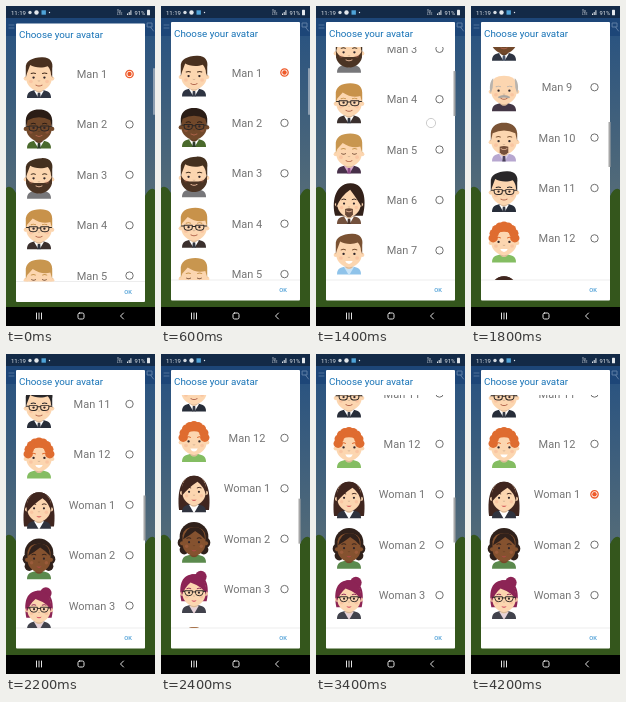
These frames come from a looping animation (149 by 320 pixels, 4400 ms). An HTML page:

```html
<!DOCTYPE html>
<html lang="en">
<head>
<meta charset="utf-8">
<title>Avatar picker</title>
<style>
html, body { margin: 0; width: 100%; height: 100%; overflow: hidden; background: #000; }
svg { display: block; width: 149px; height: 320px; font-family: Roboto, Arial, sans-serif; }
.label { font-size: 11px; fill: #757575; text-anchor: middle; }
.line { fill: none; stroke-linecap: round; stroke-linejoin: round; }
.ring { fill: none; stroke: #707070; stroke-width: 1; }
.dot { fill: none; }
.on .ring { stroke: #ee5a2a; stroke-width: 1.3; }
.on .dot { fill: #ee5a2a; }
</style>
</head>
<body>
<svg viewBox="0 0 149 320">
  <defs>
    <clipPath id="view"><rect x="10" y="41" width="129" height="233"/></clipPath>
    <linearGradient id="sky" x1="0" y1="0" x2="0" y2="1">
      <stop offset="0" stop-color="#2b5480"/><stop offset="1" stop-color="#556c78"/>
    </linearGradient>
  </defs>

  <rect y="12" width="149" height="18" fill="#1d4678"/>
  <rect y="30" width="149" height="165" fill="url(#sky)"/>
  <path d="M0 182Q5 178 10 187V301H0ZM139 190Q144 180 149 184V301H139Z" fill="#34561c"/>
  <rect y="192" width="149" height="109" fill="#34561c"/>
  <path class="line" d="M3 19H8M3 22H8" stroke="#4f7099"/>
  <path class="line" d="M141.5 17H146V21H141.5ZM144.5 21L147.5 25" stroke="#5d7ca3"/>

  <rect width="149" height="12" fill="#132a47"/>
  <g fill="#e4e8ec" font-size="6">
    <text x="5" y="8.8">11:19</text>
    <circle cx="24" cy="6.5" r="1.7" fill="#d6dce2"/>
    <circle cx="30.5" cy="6.5" r="2.2"/>
    <rect x="35.5" y="4.3" width="4.4" height="4.4" fill="#4fa3d8"/>
    <circle cx="43.5" cy="6.5" r=".7"/>
    <text x="111" y="6.3" font-size="3.4">Vo</text>
    <text x="111" y="9.4" font-size="3.4">LTE</text>
    <path d="M121 9V7.5H122V9ZM122.7 9V6H123.7V9ZM124.4 9V4.2H125.4V9Z"/>
    <text x="128.5" y="8.8" font-size="5.8">91%</text>
    <rect x="141" y="3.7" width="3" height="5.6" rx=".6"/>
  </g>
  <rect id="handle" x="147" y="62" width="2" height="47" rx="1" fill="#8fa0b2"/>

  <g id="dialog">
    <rect x="10" y="16" width="129" height="278.5" rx="1" fill="#fff"/>
    <text x="13" y="30.8" font-size="9.8" fill="#1672b6">Choose your avatar</text>
    <path d="M10 274H139" stroke="#e6e6e6" stroke-width=".7"/>
    <g clip-path="url(#view)">
      <g id="list"></g>
    </g>
    <rect id="bar" x="137.5" width="2" height="45" fill="#a6a6a6"/>
    <text x="122" y="286" font-size="5.8" font-weight="500" text-anchor="middle" fill="#4d9fd6">OK</text>
  </g>
  <circle id="ripple" cx="123.5" cy="140" r="8" fill="#0001"/>
  <circle id="touch" r="4.6" fill="#fff" fill-opacity=".6" stroke="#c0c0c0" stroke-width=".8"/>

  <rect y="301" width="149" height="19" fill="#000"/>
  <g class="line" stroke="#e2e2e2">
    <path d="M30.5 307V313M33 307V313M35.5 307V313M117.5 307L114.5 310L117.5 313"/>
    <rect x="72" y="307" width="6" height="6" rx="1.6"/>
  </g>
</svg>
<script>
const PITCH = 50.4, FIRST = 66.5, STEP = 200, LOOP = 4400, PICK = 3800;
const $ = id => document.getElementById(id);
const path = (d, fill) => `<path d="${d}" fill="${fill}"/>`;
const line = (d, color, w = 0.8) => `<path class="line" d="${d}" stroke="${color}" stroke-width="${w}"/>`;
const dot = (x, y, r, fill) => `<circle cx="${x}" cy="${y}" r="${r}" fill="${fill}"/>`;
const pair = (x, y, r, fill) => dot(-x, y, r, fill) + dot(x, y, r, fill);

const PALE = '#fcd6b0', DARK = '#71482a', NAVY = '#2e3442';

function curls(color, n, r, spread) {
  let out = '';
  for (let i = 0; i < n; i++) {
    const a = Math.PI * (1.02 + 0.96 * i / (n - 1));
    out += dot((Math.cos(a) * spread).toFixed(1), (-3 + Math.sin(a) * 11).toFixed(1), r, color);
  }
  return out;
}

// Each style returns [behind the face, in front of it].
const hairStyles = {
  crop: c => ['', path('M-10.5 0V-8C-11 -15 -5 -17 2 -17.5C9 -18 11.5 -13 10.5 -8V0L9.5 -3C9.5 -6 8.5 -8 7 -10C2 -8 -4 -9 -7 -11L-9.5 -4Z', c)],
  fringe: c => ['', path('M-10.5 0V-7C-11 -14 -6 -17 1 -17S11 -14 10.5 -7V0L9 -6Q2 -4 -5 -9L-9.3 -4Z', c)],
  buzz: c => ['', path('M-10.5 0V-7C-10 -14 -5 -16 0 -16S10 -14 10.5 -7V0L9 -7Q0 -12 -9 -7Z', c)],
  bald: c => ['', path('M-10.5 2C-12 -3 -11 -9 -8.5 -11L-9 -3ZM10.5 2C12 -3 11 -9 8.5 -11L9 -3Z', c)],
  curly: c => ['', curls(c, 9, 3.7, 8.6) + path('M-9 -7Q0 -20 9 -7Q0 -11 -9 -7Z', c)],
  afro: c => [dot(0, -5, 12.5, c) + pair(9.5, 0, 4.7, c) + pair(8.5, 6, 4, c), path('M-9.5 -3Q-7 -14 1 -13Q9 -13 9.5 -3Q6 -7 1 -10Q-4 -6 -9.5 -3Z', c)],
  shaggy: c => [path('M-12 10C-15 0 -13 -17 1 -17.5S15 0 12 10Z', c), path('M-11 3C-12 -8 -8 -17 1 -17S12 -8 11 3Q8 -3 1 -12Q-7 -7 -11 3Z', c)],
  long: c => [path('M-13 15C-14 8 -15 -14 0 -14S14 8 13 15Z', c), path('M-10.5 3C-12 -8 -7 -14 0 -14S12 -8 10.5 3Q9 -5 3 -9Q-5 -4 -10.5 3Z', c)],
  bun: c => [dot(6, -14, 5, c) + path('M-11 7C-14 -8 -10 -16 0 -16S14 -8 11 7Z', c), path('M-10.5 2C-13 -8 -7 -16 0 -16S12 -8 10.5 2Q9 -5 -3 -9Q-8 -5 -10.5 2Z', c)]
};

function face({ skin = PALE, hair, glasses, beard, goatee, stache, closed, teeth, lips }, front) {
  let s = pair(10.4, 0.5, 1.8, skin);
  s += path('M-10 -6Q-9 -13 0 -13T10 -6V1C10 7 4 11 0 11S-10 7 -10 1Z', skin);
  if (beard) s += path('M-10.3 -2C-8 4 -5 3.5 0 3.5S8 4 10.3 -2V4C9 10 4 12.5 0 12.5S-9 10 -10.3 4Z', beard);
  if (goatee) s += path('M-3.4 4.3Q0 3 3.4 4.3V9Q2 11.3 0 11.3T-3.4 9Z', goatee);
  s += front;
  s += closed ? line('M-5.8 0Q-4.3 1.2 -2.8 0M2.8 0Q4.3 1.2 5.8 0', '#7d563f') : pair(4.3, -0.4, 0.95, '#30262a');
  s += line('M-6.2 -3.8Q-4.4 -4.8 -2.8 -3.8M2.8 -3.8Q4.4 -4.8 6.2 -3.8', hair);
  s += pair(6.4, 3, 1.5, '#f0806a33') + line('M-.7 2.5Q0 3 .7 2.5', '#0003', 0.6);
  if (glasses) s += line('M-7.8 -2H-1.4V.3Q-1.6 2.2 -4.6 2.2T-7.8 0ZM7.8 -2H1.4V.3Q1.6 2.2 4.6 2.2T7.8 0ZM-1.4 -1H1.4M-10 -1.5H-8M8 -1.5H10', '#2b2624');
  if (stache) s += path('M-5 5Q0 1.5 5 5L4 6Q0 4.5 -4 6Z', stache);
  if (teeth) return s + path('M-3 5.6H3Q2 8.2 0 8.2T-3 5.6Z', '#fff');
  if (lips) return s + path('M-2.3 6Q0 6.8 2.3 6Q0 8.8 -2.3 6Z', lips);
  return s + line('M-2.4 6Q0 7.6 2.4 6', beard || goatee ? '#e9b99a' : '#b0644c');
}

function avatar(look) {
  const { skin = PALE, hair, cut = 'crop', top = NAVY, shirt, tie } = look;
  const [back, front] = hairStyles[cut](hair);
  const head = `<g transform="translate(0 4) scale(${back ? 1.15 : 1.26} 1.18)">`;
  let s = head + back + '</g>' + path('M-12 24C-12 18.5 -9 17 -4 16H4C9 17 12 18.5 12 24Z', top);
  if (shirt) s += path('M-5 16.5L0 25L5 16.5Z', shirt);
  if (tie) s += path('M-1.2 18.5H1.2L1.7 24H-1.7Z', tie);
  s += path('M-3.6 12H3.6V17Q0 20 -3.6 17Z', skin) + path('M-3.6 15.5H3.6V17Q0 19.5 -3.6 17Z', '#0002');
  return s + head + face(look, front) + '</g>';
}

const men = [
  { hair: '#49301f', shirt: '#fff', tie: '#363b49' },
  { skin: DARK, hair: '#2b1d16', cut: 'buzz', top: '#4a6a2c', shirt: '#fff', tie: '#2c3c28', glasses: 1 },
  { hair: '#44301f', top: '#77777a', beard: '#4b3424' },
  { hair: '#c8924a', cut: 'fringe', top: '#3b302e', shirt: '#fff', tie: '#30343f', glasses: 1 },
  { hair: '#c8964f', cut: 'fringe', top: '#473049', shirt: '#d9a9cf', tie: '#8a4a83', closed: 1 },
  { hair: '#33211a', cut: 'shaggy', top: '#73513d', shirt: '#fff', tie: '#4b352b', goatee: '#6b4a38' },
  { hair: '#7a5233', top: '#8fc3ea', shirt: '#c9e4f8', teeth: 1 },
  { skin: DARK, hair: '#30241f', cut: 'curly', shirt: '#fff', tie: '#485469' },
  { hair: '#b9b4ae', cut: 'bald', top: '#433645', stache: '#aaa5a0' },
  { hair: '#7b5436', cut: 'buzz', top: '#b7a7d0', shirt: '#d9cfe8', tie: '#4b425d', goatee: '#76503a' },
  { hair: '#292729', top: '#272d39', shirt: '#fff', tie: '#343945', glasses: 1 },
  { hair: '#df6c30', cut: 'curly', top: '#84bd62', teeth: 1 }
];
const women = [
  { hair: '#40261f', cut: 'long', top: '#30333e', shirt: '#fff', lips: '#d55f5d' },
  { skin: '#85522f', hair: '#30211b', cut: 'afro', top: '#5b8a4d', lips: '#ad4a45' },
  { hair: '#8c2455', cut: 'bun', top: '#41424c', shirt: '#e6d2d8', glasses: 1, lips: '#cf4460' },
  { hair: '#a8744d', cut: 'long', top: '#bf6670', lips: '#cf5b57' }
];

function row(look, i) {
  const name = i < men.length ? `Man ${i + 1}` : `Woman ${i - men.length + 1}`;
  return `<g class="row" transform="translate(0 ${FIRST + i * PITCH})">
    <g transform="translate(33 0)">${avatar(look)}</g>
    <text class="label" x="86" y="4">${name}</text>
    <circle class="ring" cx="123.5" r="3.7"/><circle class="dot" cx="123.5" r="2.2"/></g>`;
}
$('list').innerHTML = [...men, ...women].map(row).join('');
const rows = document.querySelectorAll('.row');

const ramp = (t, a, b) => Math.min(1, Math.max(0, (t - a) / (b - a)));

// Drag, decelerating fling, then a small drag back.
function scrollAt(t) {
  if (t <= 1400) return 124.5 * ramp(t, 1000, 1400) ** 3;
  if (t <= 2400) return 537 - 412.5 * (1 - ramp(t, 1400, 2400)) ** 2;
  return 537 - 6 * ramp(t, 2600, 3200);
}

function touchAt(t, scroll) {
  if (t >= 1000 && t <= 1400) return [115, 241.5 - scroll];
  if (t >= 2600 && t <= 3200) return [104, 792 - scroll];
  if (t === PICK - STEP) return [123.5, 141];
  return null;
}

function draw() {
  const t = Math.floor(performance.now() % LOOP / STEP) * STEP;
  const scroll = scrollAt(t), touch = touchAt(t, scroll);
  $('dialog').setAttribute('transform', `translate(0 ${1.5 * (1 - ramp(t, 0, 400)) ** 2})`);
  $('list').setAttribute('transform', `translate(0 ${-scroll})`);
  $('handle').setAttribute('opacity', 1 - ramp(t, 800, 1200));
  $('bar').setAttribute('y', 41 + scroll * 0.193);
  $('bar').setAttribute('opacity', t >= 1200 && t < PICK ? 1 : 0);
  $('ripple').setAttribute('opacity', t === PICK ? 1 : 0);
  $('touch').setAttribute('opacity', touch ? 1 : 0);
  if (touch) $('touch').setAttribute('transform', `translate(${touch})`);
  const picked = t < PICK ? 0 : men.length;
  rows.forEach((r, i) => r.classList.toggle('on', i === picked));
  requestAnimationFrame(draw);
}
draw();
</script>
</body>
</html>
```
